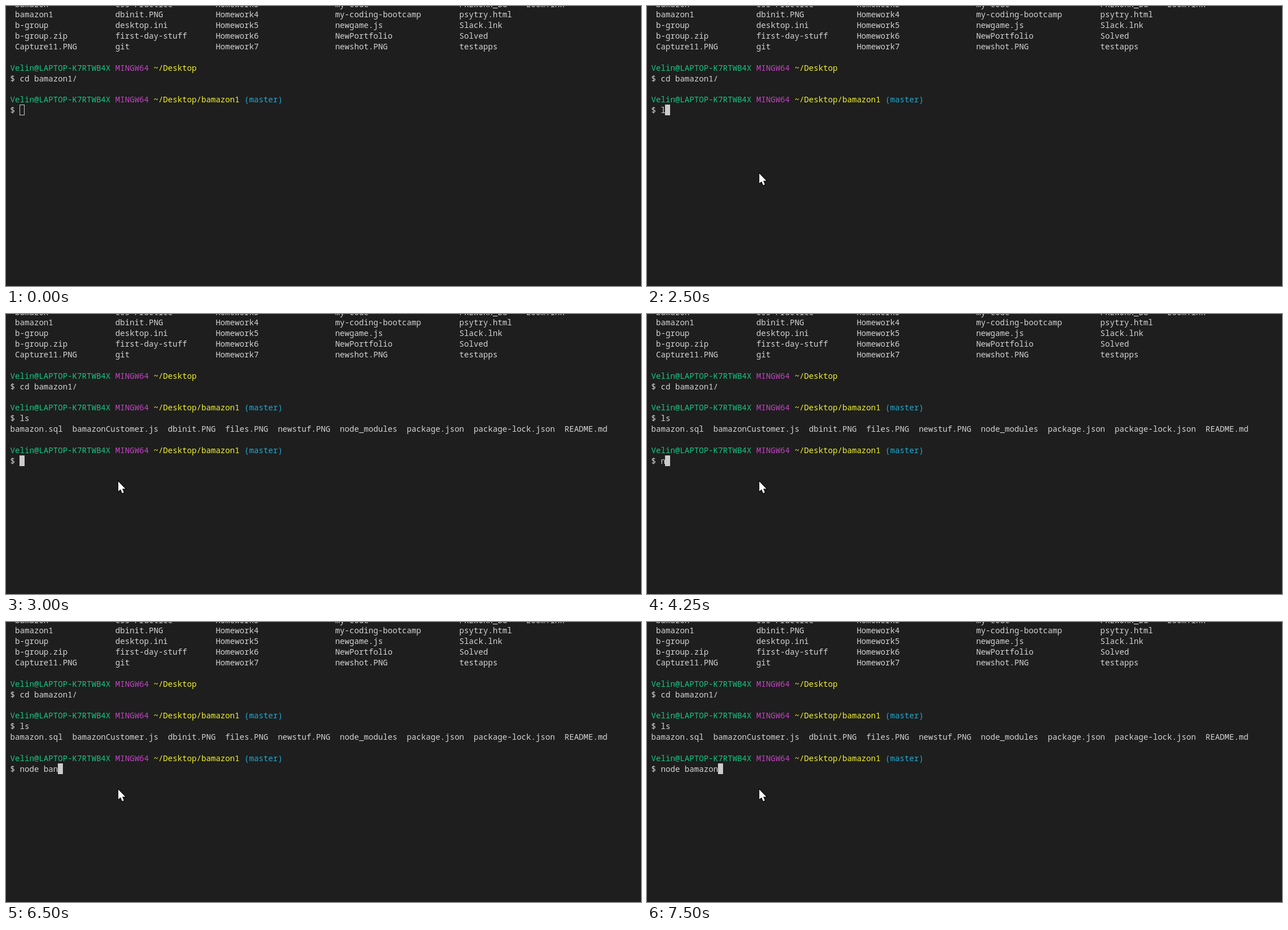
These frames come from a looping animation (1127x497 px, 8 s). An HTML page with a canvas:

```html
<!DOCTYPE html>
<html lang="en">
<head>
<meta charset="utf-8">
<title>Terminal session</title>
<style>
  html, body { margin: 0; width: 100%; height: 100%; overflow: hidden; background: #1e1e1e; }
  canvas { display: block; }
</style>
</head>
<body>
<canvas id="stage" width="1127" height="497"></canvas>
<script>
const ctx = document.getElementById('stage').getContext('2d');
const LOOP = 8000, CELL = 8.48, LINE = 18.85, LEFT = 7.5, TOP = -13.1;
const WHITE = '#d4d4d4', GREEN = '#16c784', MAGENTA = '#c244c2', YELLOW = '#f2f22c', CYAN = '#1cacd6';

const listingColumns = [1, 22, 43, 68, 94, 108];
const listing = [
  'bamazon css-Practice Homework3 my-code PREWORK_Bd Zoom.lnk',
  'bamazon1 dbinit.PNG Homework4 my-coding-bootcamp psytry.html',
  'b-group desktop.ini Homework5 newgame.js Slack.lnk',
  'b-group.zip first-day-stuff Homework6 NewPortfolio Solved',
  'Capture11.PNG git Homework7 newshot.PNG testapps'
];
const projectFiles = 'bamazon.sql  bamazonCustomer.js  dbinit.PNG  files.PNG  newstuf.PNG  ' +
  'node_modules  package.json  package-lock.json  README.md';

// Each step list holds [start time, value]; the latest started step applies.
const firstCommand = [[0, ''], [2500, 'l'], [2750, 'ls']];
const secondCommand = [[0, ''], [4250, 'n'], [4500, 'no'], [4750, 'node '], [6000, 'node b'],
  [6250, 'node ba'], [6500, 'node ban'], [6750, 'node ba'], [7000, 'node bam'], [7250, 'node bamazon']];
const pointerPath = [[0, null], [250, [528, 451]], [500, [203, 298]], [750, [199, 297]]];
const at = (steps, t) => steps.filter(([start]) => start <= t).pop()[1];

const arrow = new Path2D('M.3 .3V17.8L4.3 14.2L7.2 21L10.2 19.7L7.4 13.2H12.8Z');

// Characters sit on the terminal's fixed grid.
function print(row, col, text, color = WHITE) {
  ctx.fillStyle = color;
  [...text].forEach((char, i) =>
    ctx.fillText(char, LEFT + (col + i) * CELL, TOP + row * LINE + 14.7));
}

function prompt(row, path, branch = '') {
  print(row, 0, 'Velin@LAPTOP-K7RTWB4X', GREEN);
  print(row, 22, 'MINGW64', MAGENTA);
  print(row, 30, path, YELLOW);
  print(row, 31 + path.length, branch, CYAN);
}

function command(row, text) {
  print(row, 0, '$ ' + text);
}

function cursor(row, col, focused) {
  const x = Math.floor(LEFT + col * CELL), y = Math.round(TOP + row * LINE);
  ctx.fillStyle = ctx.strokeStyle = '#cccccc';
  ctx.lineWidth = 1;
  if (focused) ctx.fillRect(x, y, 9, 19);
  else ctx.strokeRect(x + .5, y + .5, 8, 18);
}

function pointer([x, y]) {
  ctx.save();
  ctx.translate(x, y);
  ctx.fillStyle = '#fff';
  ctx.strokeStyle = '#000';
  ctx.lineWidth = 2;
  ctx.stroke(arrow);
  ctx.fill(arrow);
  ctx.restore();
}

function draw(t) {
  ctx.fillStyle = '#1e1e1e';
  ctx.fillRect(0, 0, 1127, 497);
  ctx.font = '500 14.13px "Noto Sans Mono", monospace';

  listing.forEach((line, row) =>
    line.split(' ').forEach((name, i) => print(row, listingColumns[i], name)));
  prompt(6, '~/Desktop');
  command(7, 'cd bamazon1/');

  const first = at(firstCommand, t), second = at(secondCommand, t);
  prompt(9, '~/Desktop/bamazon1', '(master)');
  command(10, first);

  if (t >= 2750) print(11, 0, projectFiles);
  if (t >= 3000) {
    prompt(13, '~/Desktop/bamazon1', '(master)');
    command(14, second);
    cursor(14, 2 + second.length, true);
  } else if (t >= 2750) {
    cursor(12, 0, true);
  } else {
    cursor(10, 2 + first.length, t >= 2000);
  }

  const position = at(pointerPath, t);
  if (position) pointer(position);
}

const begin = performance.now();
function tick() {
  draw((performance.now() - begin) % LOOP);
  requestAnimationFrame(tick);
}
tick();
</script>
</body>
</html>
```
